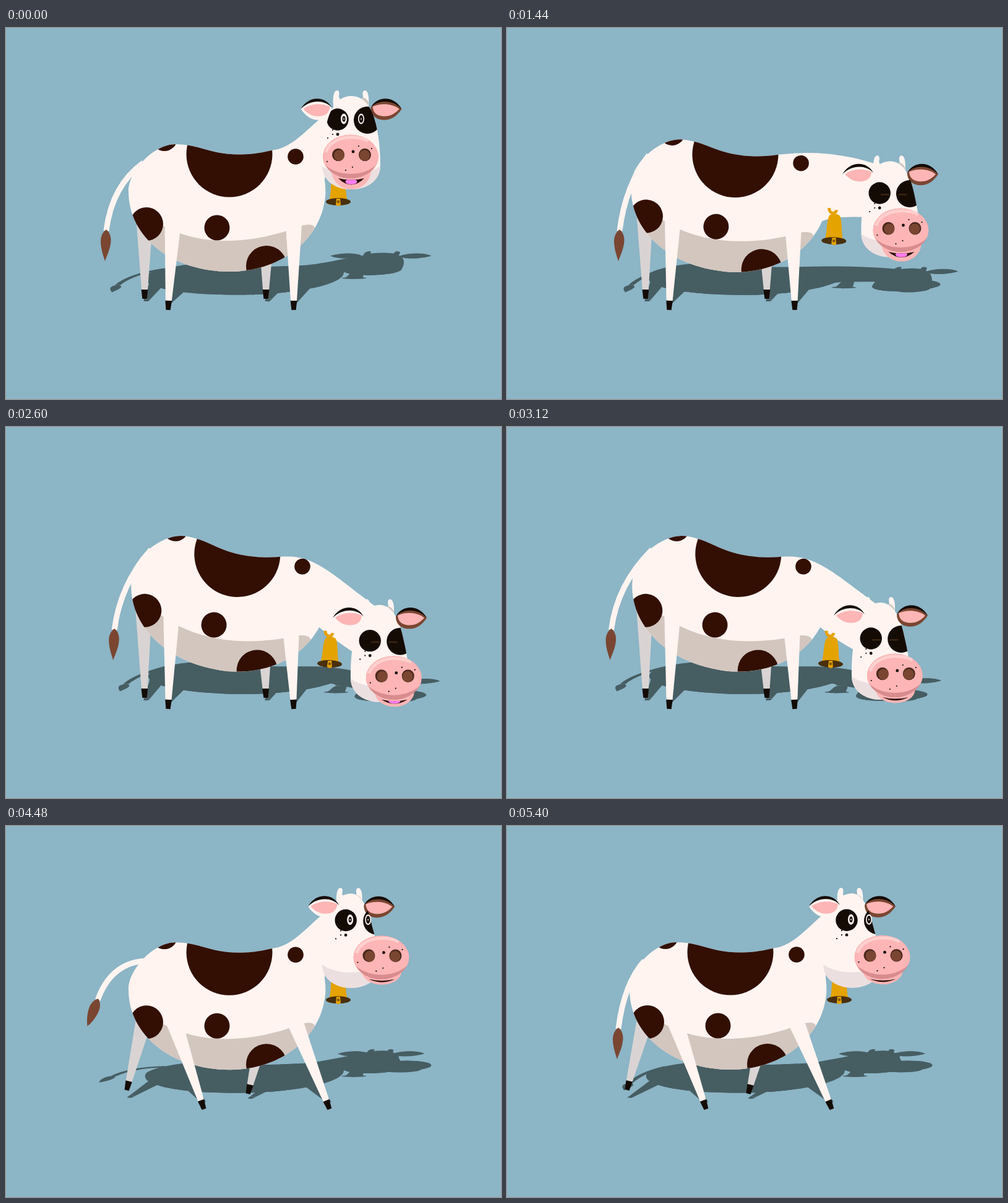
An HTML page with a canvas for the animation above (5.44 s loop, 800 by 600 pixels).

```html
<!DOCTYPE html>
<html lang="en">
<head>
<meta charset="utf-8">
<title>Cow</title>
<style>
  html, body { margin: 0; width: 100%; height: 100%; overflow: hidden; background: #8cb5c6; }
  canvas { display: block; width: 800px; height: 600px; }
</style>
</head>
<body>
<canvas id="stage" width="800" height="600"></canvas>
<script>
const ctx = document.getElementById('stage').getContext('2d');
const LOOP = 5440, STEP = 40;
const SKY = '#8cb5c6', SHADE = '#465d62';
const WHITE = '#fff4f0', SPOT = '#320f02', BLACK = '#140b05', PINK = '#fdb5b5';
const BROWN = '#7a4631', GOLD = '#e5a300', BELLY = '#d3c6be', FAR = '#d9d4d3';

// Easing: ramp goes from 0 to 1, bump goes from 0 to 1 and back
const lerp = (a, b, k) => a + (b - a) * k;
const part = (t, a, b) => Math.min(1, Math.max(0, (t - a) / (b - a)));
const ramp = (t, a, b) => Math.sin(part(t, a, b) * Math.PI / 2) ** 2;
const bump = (t, a, b) => Math.sin(part(t, a, b) * Math.PI) ** 2;

// The whole pose at time t: moo, bend down, chew, rise, walk
function poseAt(t) {
  const settle = ramp(t, 560, 800), fall = ramp(t, 1140, 1660), rise = ramp(t, 3220, 3760);
  const graze = fall - rise, moo = bump(t, 0, 600), step = bump(t, 4440, 5400);
  const chew = graze * Math.sin(Math.PI * (t - 2080) / 693) ** 2;
  return {
    graze, step,
    x: 558 + 46 * graze + 35 * bump(t, 1140, 1660) + 7 * moo,
    y: 130 + 170 * graze + chew * (4 + 14 * bump(t, 1660, 3120)) - 26 * moo - rise,
    turn: .17 * settle + .31 * fall + .52 * rise,
    down: .15 * settle + .85 * graze + .11 * rise,
    open: (1 - .4 * fall) * (1 - .9 * chew) * (1 - rise),
    shut: (t >= 720 && t < 900) || (t >= 1300 && t < 3440),
    stride: ramp(t, 3920, 4440) - 2 * step,
    whip: bump(t, 0, 800) + bump(t, 4280, 5180),
    sway: 20 * ramp(t, 800, 1200) - 18 * ramp(t, 1700, 3840) + 16 * ramp(t, 4700, 5400)
  };
}

let flat = null; // single colour used while casting the shadow

function fill(color, path) {
  ctx.fillStyle = flat || color;
  ctx.fill(path);
}
const shape = (color, d) => fill(color, new Path2D(d));

function oval(color, x, y, rx, ry = rx) {
  const p = new Path2D();
  p.ellipse(x, y, rx, ry, 0, 0, 7);
  fill(color, p);
}
function line(color, width, d) {
  ctx.strokeStyle = flat || color;
  ctx.lineWidth = width;
  ctx.stroke(new Path2D(d));
}
function group(paint, x = 0, y = 0, angle = 0, clip) {
  ctx.save();
  ctx.translate(x, y);
  ctx.rotate(angle);
  if (clip) ctx.clip(clip);
  paint();
  ctx.restore();
}

// The trunk turns as one piece when grazing
const PIVOT = [358, 289], LEAN = 8.7 * Math.PI / 180;
function lean(x, y, n) {
  const c = Math.cos(LEAN * n), s = Math.sin(LEAN * n);
  const dx = x - PIVOT[0], dy = y - PIVOT[1];
  return [PIVOT[0] + dx * c - dy * s, PIVOT[1] + dx * s + dy * c];
}

const TRUNK = new Path2D('M198 264C198 232 238 188 274 188C312 188 328 204 375 204.5' +
  'C410 204.5 425 198 440 196L511 226C517 250 518 268 514 285' +
  'C502 347 440 394 362 394C270 394 198 340 198 264Z');

function trunk() {
  fill(WHITE, TRUNK);
  group(() => {
    shape(BELLY, 'M225 300C300 364 410 346 470 322C490 315 500 318 499 325C496 340 486 352 470 372V420H220Z');
    oval(SPOT, 361, 204, 69.5);
    oval(SPOT, 227, 317, 27);
    oval(SPOT, 341, 323, 20.5);
    oval(SPOT, 256, 178, 21);
    oval(SPOT, 421, 385, 33);
  }, 0, 0, 0, TRUNK);
  oval(SPOT, 468, 208, 12.8);
}

function leg(color, hip, foot, width) {
  const dx = foot[0] - hip[0], dy = foot[1] - hip[1], len = Math.hypot(dx, dy);
  group(() => {
    shape(color, `M${-width / 2} 0H${width / 2}L5 ${len - 15}H-5Z`);
    shape(BLACK, `M-5.3 ${len - 15}H5.3L3.6 ${len}H-3.6Z`);
  }, hip[0], hip[1], Math.atan2(-dx, dy));
}

// Hanging tail swings sideways; whip lifts it towards a raised curl
function tail({ graze, whip, sway }) {
  const at = (x, y, upX, upY) => [lerp(x + sway, upX, whip), lerp(y, upY, whip)];
  const bend = at(171, 255, 163, 178), end = at(162, 328, 126, 214), tip = at(160, 375, 90, 246);
  const dx = tip[0] - end[0], dy = tip[1] - end[1], len = Math.hypot(dx, dy) + 2;
  line(WHITE, 9, `M${lean(222, 218, graze)}Q${bend} ${end}`);
  group(() => shape(BROWN, `M0 -2C7 3 9 12 8 20C7 31 3 40 0 ${len}C-3 40 -7 31 -8 20C-9 12 -7 3 0 -2Z`),
    ...end, Math.atan2(-dx, dy));
}

function bell(n) {
  group(() => {
    line(GOLD, 5, 'M-9 -53C-9 -43 2 -42 3 -50');
    shape(GOLD, 'M-9 -40C-6 -45 6 -45 9 -40C13 -30 11 -14 15 -1H-15C-11 -14 -13 -30 -9 -40Z');
    oval('#49300c', 0, 0, 20, 6);
    shape(GOLD, 'M-3 -5H3L4 5Q0 9 -4 5Z');
    oval('#8a5d08', 0, 0, 2.4);
  }, lerp(537, 523, n), lerp(281, 383, n), .04 * n);
}

// Spans from the shoulder to the crown, then from the jaw to the chest
function neck({ graze: n, x, y }) {
  const add = (p, dx, dy) => [p[0] + dx, p[1] + dy];
  const back = lean(440, 196, n), chest = lean(508, 300, n);
  const crown = [x - 13 + 20 * n, y - 5 - 3 * n], jaw = [x - 38 - 4 * n, y + 92 - 35 * n];
  shape(WHITE, `M${back}C${add(back, 40 + 12 * n, 10 * n - 12)} ${add(crown, -42 - 29 * n, 13 - 62 * n)} ${crown}` +
    `L${jaw}Q${add(chest, 6 + 17 * n, 80 * n - 60)} ${chest}L430 270Z`);
}

function ear(x, side) {
  group(() => {
    ctx.scale(side, 1);
    shape(side > 0 ? WHITE : BROWN, 'M0 0C12 -18 38 -20 50 -2C50 8 44 16 32 17.5C18 19 8 12 0 0Z');
    shape(BLACK, 'M0 0C12 -22 40 -22 50 -2C38 -16 14 -15 0 0Z');
    shape(PINK, 'M4 0C15 -9 34 -10 47 -4C46 5 42 10 32 11.5C20 13 11 8 4 0Z');
  }, x, 1);
}

function horn(x, side) {
  group(() => {
    ctx.scale(side, 1);
    shape(WHITE, 'M-5 26C-6 12 -5 2 0 0C5 -1 5 5 4 9C4 14 8 17 14 17L12 30Z');
    if (side < 0) shape('#cfc6c1', 'M-5 20C-3 14 2 11 5 11C5 15 7 17 10 17L-2 27Z');
  }, x, -29);
}

function eye(x, y, rx, ry, shut) {
  if (shut) return shape('#3a2410', `M${x - 7} ${y + 2}h14v2.6h-14Z`);
  oval(WHITE, x, y, 5, 8.5);
  oval(BLACK, x, y, rx, ry);
  oval(WHITE, x, y, .8, 1.6);
}

const MUZZLE = new Path2D();
MUZZLE.ellipse(0, 0, 45, 35.5, 0, 0, 7);

function freckles(points) {
  points.forEach(([x, y], i) => oval(BLACK, x, y, i ? 1.1 : 2.4));
}

function muzzle(open) {
  oval(PINK, 1, 22, 32, 22 + 9 * open);
  const lips = new Path2D(`M-20 35Q1 40 22 35Q1 ${45 + 11 * open} -20 35Z`);
  fill('#2a0d08', lips);
  if (open > .3) group(() => oval('#ff7df0', 1, 36 + 4.5 * open, 9.5, 4.5), 0, 0, 0, lips);
  group(() => {
    fill('#d98c8d', MUZZLE);
    oval(PINK, 0, -9, 52, 37);
    line('#ffd0ce', 5, 'M-40 -7C-35 -24 -15 -33 8 -31C18 -30 24 -28 28 -25');
  }, 0, 0, 0, MUZZLE);
  for (const x of [-20, 23]) {
    oval('#4b291c', x, -3, 10, 10.3);
    oval(BROWN, x + (x < 0 ? 1.5 : -.5), -2, 8.4, 8.8);
  }
  freckles([[4, -8], [3, 17], [13, -17], [34, -13], [-38, 8], [-8, 22]]);
}

function head({ turn: u, down: v, open, shut }) {
  const k = 6 * v, eyeY = 18 + 20 * v, px = -22 + 13 * u, side = 8 * u;
  const skull = new Path2D(`M0 -20C${22 - side} -20 ${34 - side} 0 ${40 - side} 26C${45 - side} 48 47 70 47 ${92 + k}` +
    `C47 ${118 + k} 24 ${131 + k} 0 ${131 + k}C-24 ${131 + k} -47 ${118 + k} -47 ${92 + k}` +
    'C-47 60 -44 50 -40 26C-34 0 -22 -20 0 -20Z');
  horn(-24 + 5 * u, 1);
  horn(23 - 11 * u, -1);
  fill(WHITE, skull);
  ear(-81.5 + 11.5 * u, 1);
  ear(81.5 - 11.5 * u, -1);
  group(() => {
    shape('#ecdfe0', `M-50 ${91 + k}C-30 ${110 + k} 25 ${112 + k} 50 ${91 + k}V150H-50Z`);
    oval(BLACK, px, eyeY, 17.7);
    oval(BLACK, 26 + 15 * u, eyeY + 1, 22);
  }, 0, 0, 0, skull);
  eye(-12 + 10 * u, eyeY - 1, 2.5, 4.6, shut);
  eye(16 + 11 * u, eyeY - 1, 3.3, 6.3, shut);
  group(() => freckles([[0, 24], [-8, 24], [-8, 17], [-16, 30]]), px, eyeY);
  group(() => muzzle(open), -1 + 49.5 * u, 78 + 20 * v);
}

function cow(pose) {
  const { graze, stride, step, x, y } = pose;
  const bob = 17 * step, lift = Math.abs(stride);
  const near = stride * (stride > 0 ? 60 : 36), far = -stride * (stride > 0 ? 30 : 45);
  const hip = (hx, hy) => {
    const p = lean(hx, hy, graze);
    return [p[0], p[1] + bob];
  };

  leg(FAR, hip(224, 310), [224 + far, 438 - 11 * lift], 27);
  leg(FAR, hip(421, 310), [420 + far, 438 - 5 * lift], 29);
  group(() => {
    tail(pose);
    neck(pose);
    bell(graze);
    group(() => {
      ctx.translate(-PIVOT[0], -PIVOT[1]);
      trunk();
    }, ...PIVOT, LEAN * graze);
  }, 0, bob);
  leg(WHITE, hip(270, 311), [262 + near, 456 + 2 * lift], 27);
  leg(WHITE, hip(465, 311), [465 + near, 456 + 2 * lift], 27);
  group(() => {
    ctx.translate(0, -64);
    head(pose);
  }, x, y + 64 + bob, step * 16 * Math.PI / 180);
}

function draw() {
  const pose = poseAt(Math.floor(performance.now() % LOOP / STEP) * STEP);
  ctx.fillStyle = SKY;
  ctx.fillRect(0, 0, 800, 600);
  ctx.save();
  ctx.transform(1, 0, -.149, .24, 67.4, 337);
  flat = SHADE;
  cow(pose);
  ctx.restore();
  flat = null;
  cow(pose);
  requestAnimationFrame(draw);
}
draw();
</script>
</body>
</html>
```
